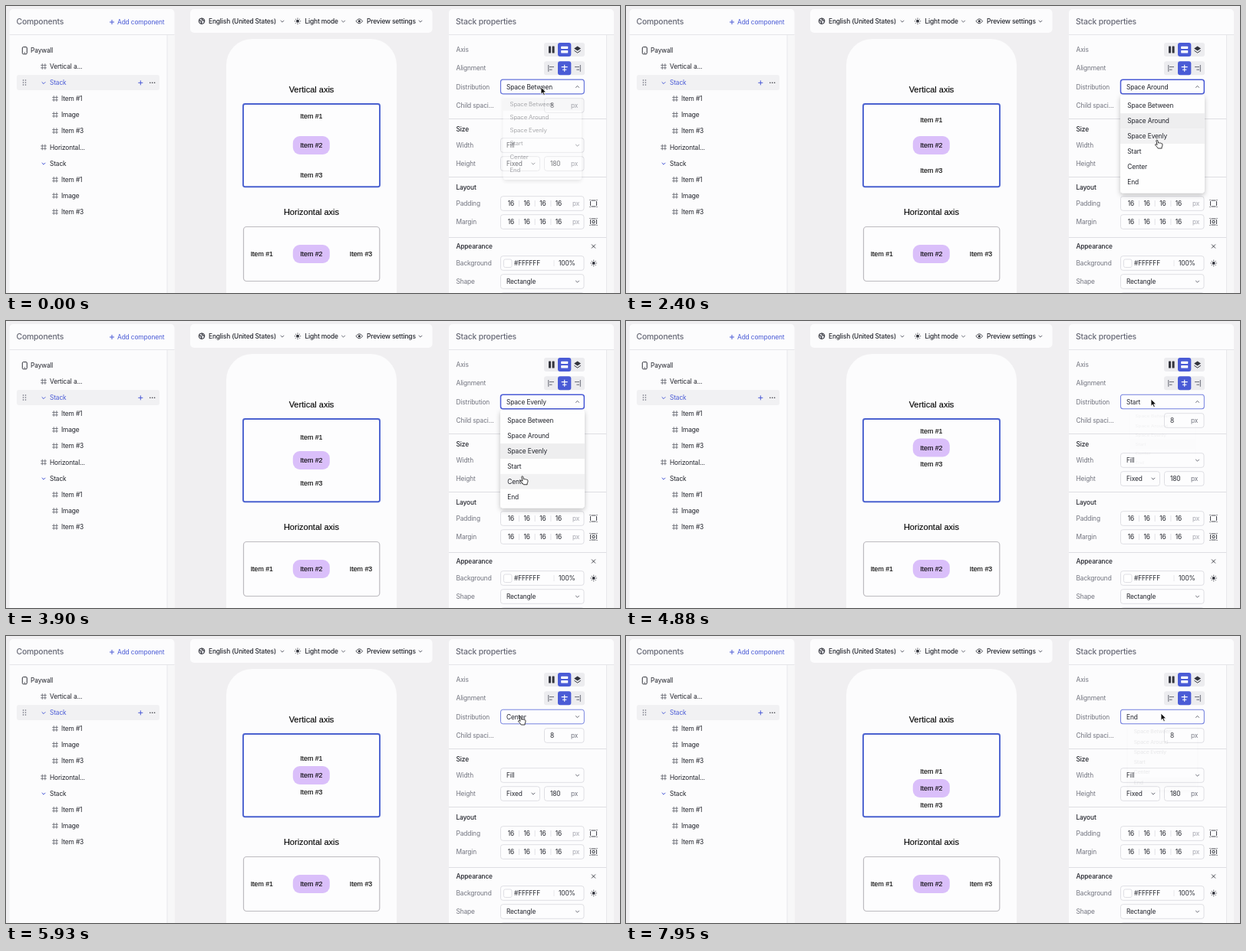
These frames come from a looping animation (800 px wide and 375 px high, 8000 ms). An HTML page:

```html
<!DOCTYPE html>
<html lang="en">
<head>
<meta charset="utf-8">
<title>Stack distribution</title>
<style>
html, body { margin: 0; width: 100%; height: 100%; overflow: hidden; background: #f0eff1; }
svg { display: block; width: 800px; height: 375px; }
text { font: 8.4px Inter, sans-serif; letter-spacing: -.017em; fill: #22242c; white-space: pre; }
.label { fill: #71737e; }
.unit { fill: #a5a6af; }
.blue { fill: #4a5bd6; }
.bold { font-weight: 500; }
.head { font-size: 10.4px; font-weight: 500; fill: #666875; }
.mid { text-anchor: middle; }
.app { font: 8.8px "Liberation Sans", Arial, sans-serif; letter-spacing: 0; text-anchor: middle; fill: #000; stroke: #000; stroke-width: .12; }
.title { font-size: 11px; }
</style>
</head>
<body>
<svg id="stage" viewBox="0 0 800 375"></svg>
<script>
const BLUE = '#4a5bd6', INK = '#33353d', LINE = '#dfdfe4';
const MODES = ['Space Between', 'Space Around', 'Space Evenly', 'Start', 'Center', 'End'];

// Vertical centres of the three items for each mode
const SPOTS = [[143.5, 182, 220.5], [149, 182, 215], [152, 182, 212],
  [143.5, 165.5, 187], [160, 182, 204], [177, 199, 221]];

// Menu visits: opened at, choice made at, mode chosen
const VISITS = [[-75, 1165, 1], [1960, 2520, 2], [3350, 4300, 3],
  [4850, 5500, 4], [6030, 6880, 5], [7908, 9000, 5]];

// Pointer stops: time, x, y
const STOPS = [[0, 697, 106], [100, 698, 109], [850, 714, 152], [1400, 714, 152],
  [1900, 695, 104], [2030, 695, 104], [2400, 692, 175], [2750, 692, 175],
  [3300, 688, 104], [3450, 688, 104], [3880, 673, 203], [4150, 672, 188],
  [4400, 672, 188], [4800, 684, 102], [4920, 684, 102], [5280, 672, 207],
  [5620, 672, 207], [5920, 670, 105], [6100, 670, 105], [6700, 680, 227],
  [7150, 680, 227], [7850, 697, 101], [8000, 697, 101]];

const rect = (x, y, w, h, r, fill, more = '') =>
  `<rect x="${x}" y="${y}" width="${w}" height="${h}" rx="${r}" fill="${fill}" ${more}/>`;
const path = (d, color = INK, width = 1, more = '') =>
  `<path d="${d}" fill="none" stroke="${color}" stroke-width="${width}" ${more}/>`;
const text = (x, y, s, cls = '', more = '') =>
  `<text x="${x}" y="${y + 3}" class="${cls}" ${more}>${s}</text>`;
const dot = (x, y, r, fill) => `<circle cx="${x}" cy="${y}" r="${r}" fill="${fill}"/>`;
const chevron = (x, y, color = '#666873', s = 2.3) =>
  path(`M${x - s} ${y - s / 2}l${s} ${s}l${s} ${-s}`, color, 1);
const plus = (x, y) => path(`M${x - 3} ${y}h6M${x} ${y - 3}v6`, BLUE, 1);
const hash = (x, y) =>
  path(`M${x - 3.8} ${y - 1.6}h7.6m0 3.4h-7.6M${x - 1.7} ${y - 3.8}v7.6m3.6 0v-7.6`, '#60626c', .8);
const field = (x, y, w) => rect(x + .5, y - 9.3, w - 1, 18.6, 3, '#fdfdfe', `stroke="${LINE}"`);

function sun(x, y) {
  let rays = '';
  for (let i = 0; i < 8; i++) {
    const c = Math.cos(i * Math.PI / 4), s = Math.sin(i * Math.PI / 4);
    rays += `M${x + 2.9 * c} ${y + 2.9 * s}L${x + 4.2 * c} ${y + 4.2 * s}`;
  }
  return dot(x, y, 2, INK) + path(rays, INK, .9);
}

function panel(x, title) {
  return rect(x, 4, 215, 390, 5, '#fcfcfd') +
    rect(x + 205.5, 38, 9.5, 340, 0, '#f7f7f8') +
    path(`M${x} 37.5h215`, '#e5e5e9') + path(`M${x + 205.5} 38v340`, '#e8e8eb') +
    text(x + 9, 20.6, title, 'head');
}

function tree() {
  const row = (x, y, s) => hash(x - 8, y) + text(x, y, s);
  const items = y => ['Item #1', 'Image', 'Item #3'].map((s, i) => row(72, y + 21.1 * i, s)).join('');
  let grip = '';
  for (let i = 0; i < 6; i++) grip += dot(22.5 + i % 2 * 3, 97 + (i >> 1) * 3, .8, '#666873');
  for (let i = 0; i < 3; i++) grip += dot(187.8 + i * 2.9, 100.3, .8, INK);
  return panel(4.5, 'Components') + plus(138, 21) + text(145, 21, 'Add component', 'blue') +
    rect(21.3, 53.6, 6, 9.2, 1.3, 'none', `stroke="${INK}"`) + path('M23.4 61h1.8', INK, .8) +
    text(32, 58, 'Paywall') + row(57, 79, 'Vertical a...') +
    rect(14, 90, 186, 20, 3, '#f1f1f3') + grip + chevron(49, 100.5, BLUE) +
    text(57, 100, 'Stack', 'blue') + plus(175.3, 100.3) + items(121) +
    row(57, 184.5, 'Horizontal...') + chevron(49, 206, BLUE) + text(57, 205.5, 'Stack') + items(226.8);
}

function topBar() {
  return rect(240, 4, 315.5, 31, 5, '#fcfcfd') +
    `<circle cx="255" cy="19.7" r="3.8" fill="#d5d5da" stroke="${INK}"/>` +
    path('M251.5 18.5l3 1.5v3M255 16l1 2.5l3 1', INK, 1.1) +
    text(264, 19.8, 'English (United States)', 'bold') + chevron(360, 20) +
    sun(380, 19.8) + text(389.5, 19.8, 'Light mode', 'bold') + chevron(439.5, 20) +
    path('M456 19.8q4.3 -6 8.6 0q-4.3 6 -8.6 0z', INK, .9) + dot(460.3, 19.8, 1.6, INK) +
    text(470, 19.8, 'Preview settings', 'bold') + chevron(540, 20);
}

function chip(x, y, n) {
  const pill = n == 2 ? rect(x - 24, -12, 48, 24, 9, '#dabffa') : '';
  return `<g class="chip" transform="translate(0 ${y})">${pill}${text(x, 0, 'Item #' + n, 'app')}</g>`;
}

function preview() {
  return rect(287, 43, 222, 400, 34, '#fcfcfd') +
    text(398, 110, 'Vertical axis', 'app title') + text(398, 270, 'Horizontal axis', 'app title') +
    rect(309, 128, 178, 108.3, 2.5, '#fdfdfe', 'stroke="#4a61cf" stroke-width="1.9"') +
    rect(309.5, 288.5, 177.3, 71, 4, '#fdfdfe', 'stroke="#bdbbc0" stroke-width="1.2"') +
    `<g id="column">${[1, 2, 3].map(n => chip(397.8, 182, n)).join('')}</g>` +
    [333.3, 397.8, 462.5].map((x, i) => chip(x, 324, i + 1)).join('');
}

function toggles(y) {
  return rect(701, y - 9, 53, 18, 3, '#ececef') + rect(719, y - 9, 17.3, 18, 3, BLUE);
}

function properties() {
  const labels = [['Axis', 57], ['Alignment', 81.3], ['Distribution', 105.5], ['Child spaci...', 130],
    ['Width', 182], ['Height', 206], ['Padding', 258], ['Margin', 282], ['Background', 336], ['Shape', 360]];
  const heads = [['Size', 161], ['Layout', 237.3], ['Appearance', 314]];
  const number = (y, s) => field(701, y, 52.5) + text(709, y, s) + text(736, y, 'px', 'label');
  const select = (y, w, s) => field(644, y, w) + text(652, y, s) + chevron(w + 635, y);
  const sides = y => field(644, y, 109.5) + text(738, y, 'px', 'unit') +
    [658, 678.7, 699.4, 720].map(x => text(x, y, '16', 'mid')).join('') +
    path(`M668.5 ${y - 4}v8m20.7 0v-8m20.7 0v8`, '#e2e2e6') +
    path(`M761.5 ${y - 3}v6m8 0v-6M762.5 ${y - 4}h6m0 8h-6`, INK, .9) +
    path([[761, -4.5], [770, -4.5], [761, 4.5], [770, 4.5]].map(
      ([x, d]) => `M${x - .5} ${y + d}h1`).join(''), INK, 1);
  return panel(577, 'Stack properties') +
    labels.map(l => text(586.5, l[1], l[0], 'label')).join('') +
    heads.map(h => text(586.5, h[1], h[0], 'bold')).join('') +
    path('M577 147.5h205M577 223.5h205M577 302.5h205', '#dedee3') +
    toggles(57) + rect(707, 52.5, 3, 9, .5, INK) + rect(711.6, 52.5, 3, 9, .5, INK) +
    rect(723.2, 52.7, 9, 3.4, .5, '#fff') + rect(723.2, 58, 9, 3.4, .5, '#fff') +
    `<path d="M740.2 55.5l4.4 -3l4.4 3l-4.4 3z" fill="${INK}"/>` +
    path('M740.4 58.2l4.2 2.9l4.2 -2.9', INK, 1) +
    toggles(81.3) + path('M706.8 77v8.8M708 79.6h6M708 83.2h3.6M748.3 77v8.8M747 79.6h-6M747 83.2h-3.6', '#666873', 1) +
    path('M727.7 76.8v9M723.7 79.6h8M725 83.2h5.4', '#fff', 1.1) +
    number(130, '8') + select(182, 109.5, 'Fill') + select(206, 52, 'Fixed') + number(206, '180') +
    sides(258) + sides(282) + rect(764, 280.5, 3, 3, .5, 'none', `stroke="${INK}"`) +
    path('M763 311.5l5 5m0 -5l-5 5', INK, .9) +
    field(644, 336, 109.5) + rect(648.5, 331, 10.5, 10.5, 2, '#fff', `stroke="${LINE}"`) +
    text(662, 336, '#FFFFFF') + text(720, 336, '100%') + path('M714 332v8', '#e8e8eb') + sun(765.7, 336) +
    select(360, 109.5, 'Rectangle') + field(644, 384, 109.5);
}

function menu() {
  return `<g>${rect(644.5, 96.2, 108.8, 18.6, 3, '#fdfdfe', `id="frame" stroke="${BLUE}"`)}` +
    text(652, 105.5, '', '', 'id="value"') + `<g id="arrow">${chevron(0, 0)}</g></g>` +
    `<g id="menu"><g filter="url(#shadow)">${rect(644, 116, 109.8, 128.5, 4, '#fefefe')}</g>` +
    MODES.map((m, i) => rect(644, 120.3 + 19.9 * i, 109.8, 19.9, 0, '#fff', 'class="option"') +
      text(653.3, 130.3 + 19.9 * i, m)).join('') + '</g>';
}

const pointers =
  '<path id="tip" d="M0 0v9.3l2.2 -2l1.5 3.5l1.6 -.7l-1.5 -3.4h3z" fill="#111" stroke="#fff" stroke-width=".8"/>' +
  '<path id="hand" d="M-1.2 .7q1.1 -1.6 2 .1l.8 3.3q1.2 -.9 1.9 .1q1.2 -.6 1.8 .4q1.6 -.3 1.7 1.2q.1 2.2 -.9 3.5v1.7h-4.9q-.9 -1.7 -3.2 -3.8q-1.2 -1.4 .2 -1.7q.9 -.1 1.9 1z" fill="#fff" stroke="#222" stroke-width=".9" stroke-linejoin="round"/>';

const $ = id => document.getElementById(id);
$('stage').innerHTML = '<defs><filter id="shadow" x="-20%" y="-20%" width="140%" height="145%">' +
  '<feDropShadow dx="0" dy="2.5" stdDeviation="3" flood-opacity=".24"/></filter></defs>' +
  tree() + topBar() + preview() + properties() + menu() + pointers;
const chips = [...$('column').children];
const options = [...document.querySelectorAll('.option')];

const clamp = v => Math.max(0, Math.min(1, v));

// cubic-bezier(.4, 0, .2, 1)
function ease(x) {
  x = clamp(x);
  let lo = 0, hi = 1;
  for (let i = 0; i < 18; i++) {
    const s = (lo + hi) / 2, q = 1 - s;
    if (1.2 * q * q * s + .6 * q * s * s + s * s * s < x) lo = s; else hi = s;
  }
  return 3 * (1 - lo) * lo * lo + lo ** 3;
}

function pointerAt(t) {
  const i = Math.max(1, STOPS.findIndex(s => s[0] >= t));
  const [a, b] = [STOPS[i - 1], STOPS[i]];
  const u = clamp((t - a[0]) / (b[0] - a[0])), k = u * u * (3 - 2 * u);
  return [a[1] + (b[1] - a[1]) * k, a[2] + (b[2] - a[2]) * k];
}

function draw(t) {
  const n = VISITS.filter(v => v[0] <= t).length - 1;
  const [start, end, choice] = VISITS[n];
  const open = t < end;
  const mode = open ? (n ? VISITS[n - 1][2] : 0) : choice;
  const [x, y] = pointerAt(t);

  // Fade over 250 ms; the scale takes two thirds of that, late when closing
  const fade = open ? ease((t - start) / 250) : 1 - ease((t - end) / 250);
  const grow = open ? ease((t - start) / 166) : 1 - ease((t - end - 83) / 166);
  const s = .75 + .25 * grow;
  $('menu').setAttribute('opacity', fade);
  $('menu').setAttribute('transform', `translate(699 116) scale(${s} ${s * s}) translate(-699 -116)`);

  const hover = open ? Math.floor((y - 120.3) / 19.9) : choice;
  options.forEach((o, i) => o.setAttribute('fill',
    i == mode ? '#eeeeef' : i == hover ? '#f2f2f3' : '#fefefe'));

  $('value').textContent = MODES[mode];
  $('arrow').setAttribute('transform', `translate(744.5 105.5) scale(1 ${open ? -1 : 1})`);
  $('frame').setAttribute('stroke-width', 1 + .5 * fade);
  $('frame').setAttribute('stroke-opacity', .75 + .25 * fade);
  chips.forEach((c, i) => c.setAttribute('transform', `translate(0 ${SPOTS[mode][i]})`));

  const hand = open ? y > 118 : fade > .5 || y < 115 || (y > 172 && y < 216);
  for (const [id, on] of [['hand', hand], ['tip', !hand]]) {
    $(id).setAttribute('visibility', on ? 'visible' : 'hidden');
    $(id).setAttribute('transform', `translate(${x} ${y})`);
  }
}

function tick(now) {
  draw(now % 8000);
  requestAnimationFrame(tick);
}
draw(0);
requestAnimationFrame(tick);
</script>
</body>
</html>
```
